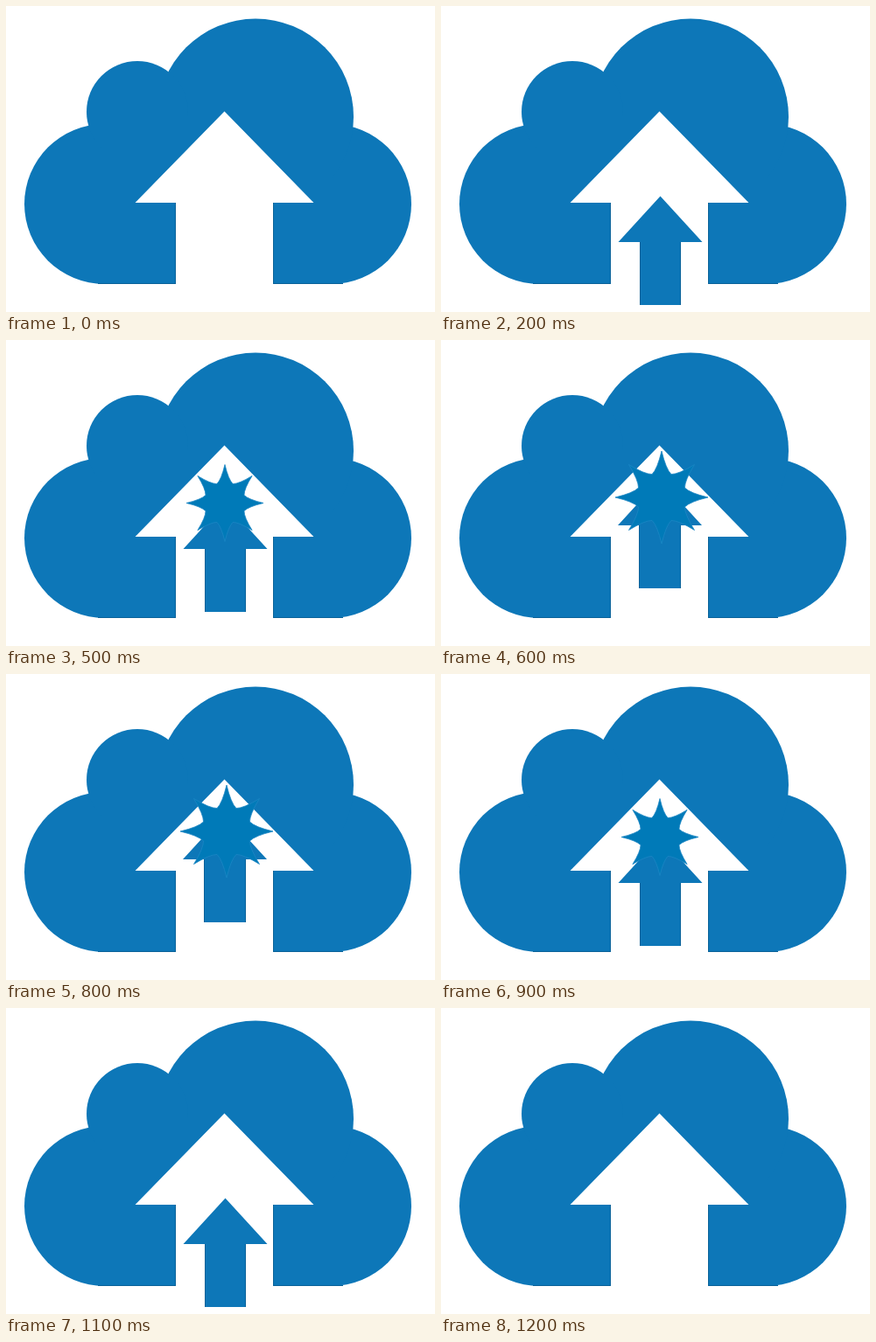
An HTML page with a canvas for the animation above (1400 ms loop, 490 px wide and 350 px high).

```html
<!DOCTYPE html>
<html lang="en">
<head>
<meta charset="utf-8">
<title>Cloud upload</title>
<style>
html, body { margin: 0; width: 100%; height: 100%; overflow: hidden; background: #fff; }
canvas { display: block; }
</style>
</head>
<body>
<canvas id="stage" width="490" height="350"></canvas>
<script>
const ctx = document.getElementById('stage').getContext('2d');
const BLUE = '#0d77b8';
const DARK = '#0a6299';
const STAR = '#007ab8';
const RIM = '#1c87c4';
const STEP = 100;
const LOOP = 1400;

// Each pose: arrow centre and lift, then the star as [x, y, radius].
const low = { x: 250.5, lift: 0 };
const raised = { x: 250.5, lift: 31 };
const spark = { ...raised, star: [249, 187, 28] };
const flare = { ...raised, star: [250, 186.5, 44] };
const burst = { x: 250, lift: 58, star: [252, 180, 53] };
const peak = { ...burst, star: [249.5, 182, 72] };
const poses = [
  null, null, low, raised, spark, flare, burst,
  peak, burst, flare, spark, low, null, null
];

function disc(x, y, r) {
  ctx.beginPath();
  ctx.arc(x, y, r, 0, Math.PI * 2);
  ctx.fill();
}

function arrow(color, x, tip, shoulder, base, head, shaft) {
  const left = Math.floor(x - shaft);
  const right = Math.ceil(x + shaft);
  ctx.fillStyle = color;
  ctx.beginPath();
  ctx.moveTo(x, tip);
  ctx.lineTo(x + head, shoulder);
  ctx.lineTo(right, shoulder);
  ctx.lineTo(right, base);
  ctx.lineTo(left, base);
  ctx.lineTo(left, shoulder);
  ctx.lineTo(x - head, shoulder);
  ctx.closePath();
  ctx.fill();
  return [left, right];
}

function star(x, y, r) {
  const at = (i, k) => {
    const a = i * Math.PI / 8 - Math.PI / 2;
    return [x + Math.cos(a) * r * k, y + Math.sin(a) * r * k];
  };
  ctx.beginPath();
  ctx.moveTo(...at(0, 1));
  for (let i = 0; i < 16; i += 2) {
    ctx.quadraticCurveTo(...at(i + 0.38, 0.62), ...at(i + 1, 0.54));
    ctx.quadraticCurveTo(...at(i + 1.62, 0.62), ...at(i + 2, 1));
  }
  ctx.closePath();
  ctx.fillStyle = STAR;
  ctx.fill();
  ctx.strokeStyle = RIM;
  ctx.lineWidth = 0.8;
  ctx.stroke();
}

function cloud() {
  ctx.fillStyle = BLUE;
  disc(112.5, 226.5, 91.5);
  disc(371.5, 226.5, 91.5);
  disc(285, 126.5, 112);
  disc(150, 121, 58);
  ctx.fillRect(112, 126, 260, 192);
  const [left, right] = arrow('#fff', 249.5, 120.5, 225, 350, 102, 55.5);
  ctx.fillStyle = DARK;
  ctx.fillRect(left - 1, 225, 1, 93);
  ctx.fillRect(right, 225, 1, 93);
  ctx.fillRect(105, 317, left - 105, 1);
  ctx.fillRect(right, 317, 80, 1);
}

function upload({ x, lift, star: burstAt }) {
  const [left, right] = arrow(BLUE, x, 217.5 - lift, 270 - lift, 342 - lift, 48, 23.5);
  ctx.fillStyle = DARK;
  ctx.fillRect(left, 270 - lift, 1, 72);
  ctx.fillRect(right - 1, 270 - lift, 1, 72);
  if (burstAt) star(...burstAt);
}

function draw(now) {
  const pose = poses[Math.floor((now % LOOP) / STEP)];
  ctx.fillStyle = '#fff';
  ctx.fillRect(0, 0, 490, 350);
  cloud();
  if (pose) upload(pose);
}

const start = performance.now();
function tick() {
  draw(performance.now() - start);
  requestAnimationFrame(tick);
}
tick();
</script>
</body>
</html>
```
